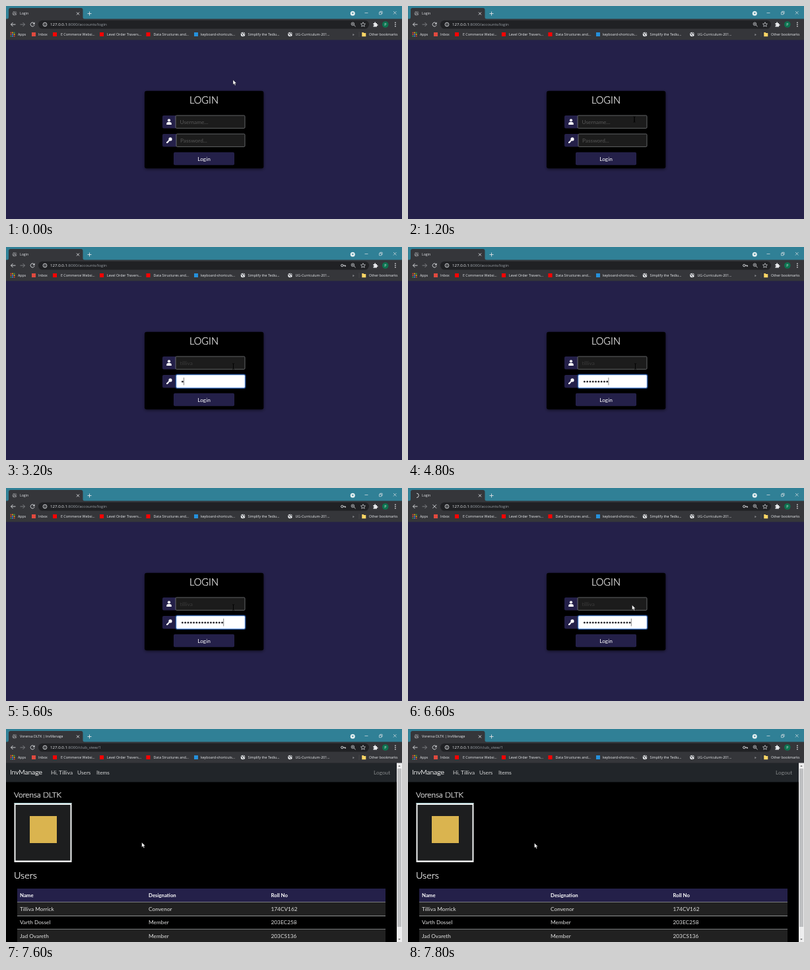
These frames come from a looping animation (600x323 px, 8 s). An HTML page:

```html
<!DOCTYPE html>
<html lang="en">
<head>
<meta charset="utf-8">
<title>Login</title>
<style>
  html, body { margin: 0; width: 100%; height: 100%; overflow: hidden; background: #242049; }
  svg { display: block; width: 100%; height: 100%; }
  text { white-space: pre; }
  .ui { font: 5.3px "Open Sans", "Noto Sans", sans-serif; fill: #e8eaed; }
  .url { font-size: 6.15px; }
  .page { font: 8.3px Lato, sans-serif; fill: #fff; }
  .cell { fill: #e2e2e2; }
  .light { font-weight: 300; stroke: #fff; stroke-width: .22; }
  .bold { font-weight: 700; font-size: 7.8px; }
  .mid { text-anchor: middle; }
  .line { fill: none; stroke: #dfe1e5; stroke-width: .9; }
  .hint { fill: #565656; }
</style>
</head>
<body>
<svg viewBox="0 0 600 323" preserveAspectRatio="none">
  <defs>
    <g id="globe">
      <circle r="3.3" fill="#e8eaed"/>
      <path d="M-2.6-1.2Q-.8-1.6-.6 0T1 2.6M.4-3Q0-1.4 1.6-1.2T3 .4" fill="none" stroke="#35363a" stroke-width="1"/>
    </g>
    <g id="key">
      <circle cx="2" cy="-1.6" r="2.6"/>
      <path d="M.8-1.5L-4 3V4.6H-1.7V3.3H-.4V2L1.8.2Z"/>
    </g>
    <filter id="shadow" x="-10%" y="-10%" width="120%" height="125%">
      <feDropShadow dx="0" dy="1.5" stdDeviation="2" flood-color="#000" flood-opacity=".5"/>
    </filter>
  </defs>

  <g id="loginPage">
    <path fill="#242049" d="M0 51H600V323H0Z"/>
    <rect x="210" y="128.7" width="180.3" height="117.6" rx="3" filter="url(#shadow)"/>
    <g class="page">
      <text class="mid light" x="300" y="148" style="font-size:14.6px">LOGIN</text>
      <path fill="#242049" d="M239 166h18v19.5h-18q-2 0-2-2v-15.5q0-2 2-2zM239 194h19v19.5h-19q-2 0-2-2v-15.5q0-2 2-2z"/>
      <circle cx="247" cy="173.3" r="2.1"/>
      <path d="M243.2 180v-1.3q0-2.7 2.7-2.7h2.2q2.7 0 2.7 2.7v1.3z"/>
      <use href="#key" x="247" y="203.5"/>
      <g id="userField">
        <rect x="257" y="166" width="105" height="19.4" rx="1.5"/>
        <rect x="257" y="166" width="105" height="19.4" rx="1.5"/>
      </g>
      <text id="userText" x="263.5" y="178.5"></text>
      <g id="passField">
        <rect x="258" y="194" width="104" height="19.4" rx="1.5"/>
        <rect x="258" y="194" width="104" height="19.4" rx="1.5"/>
      </g>
      <text id="passHint" class="hint" x="264" y="206.5">Password...</text>
      <g id="dots" fill="#26262c"></g>
      <path id="caret" stroke="#333" stroke-width=".6"/>
      <rect x="254" y="221.7" width="92" height="19.5" rx="2" fill="#242049"/>
      <text class="mid" x="300" y="234.5">Login</text>
    </g>
  </g>

  <g id="clubPage" class="page">
    <path fill="#000" d="M0 51H592V323H0Z"/>
    <path fill="#212529" d="M0 51H592V80.5H0Z"/>
    <text class="light" x="6" y="69" style="font-size:10.4px">InvManage</text>
    <g fill="#d4d5d6">
      <text x="68" y="68.5">Hi, Tilliva</text>
      <text x="108" y="68.5">Users</text>
      <text x="137" y="68.5">Items</text>
    </g>
    <text x="557" y="68.5" fill="#85888a">Logout</text>
    <g id="alert">
      <rect y="81" width="592" height="29" rx="2" fill="#d1e7dd"/>
      <text x="9" y="98.2" fill="#2c6448">You have been successfully logged in!</text>
      <path d="M576 92l7 7m0-7l-7 7" stroke="#5b6560" stroke-width=".9"/>
    </g>
    <g id="content">
      <text class="light" x="12" y="133.8" style="font-size:11.8px">Vorensa DLTK</text>
      <path fill="#f3f5f5" d="M12.5 142H99.5V232H12.5Z"/>
      <path fill="#a9cdd0" d="M12.5 142H99.5V143.2H12.5Z"/>
      <path fill="#1d1e1f" d="M14.5 145H97.5V229.5H14.5Z"/>
      <path fill="#dab44f" d="M36 162H77V203H36Z"/>
      <text class="light" x="12" y="257" style="font-size:14.4px">Users</text>
      <path fill="#242049" d="M17 272H575V293H17Z"/>
      <g id="rows"></g>
    </g>
    <path fill="#eeeeef" d="M592 51H600V323H592Z"/>
    <rect id="thumb" x="593" y="60" width="6" fill="#bfc0c2"/>
    <path fill="#666" d="M594.3 57l1.7-2 1.7 2zM594.3 318l1.7 2 1.7-2z"/>
  </g>

  <g class="ui">
    <path fill="#308096" d="M0 0H600V20H0Z"/>
    <path fill="#35363a" d="M0 19.5H2Q4 19.5 4 17V6Q4 3 7 3H113.5Q116.5 3 116.5 6V17Q116.5 19.5 119 19.5H600V51.5H0Z"/>
    <rect x="49" y="21.7" width="501" height="12.8" rx="6.4" fill="#202124"/>
    <g id="tabGlobe" opacity=".42"><use href="#globe" x="13" y="11.3"/></g>
    <path id="spinner" class="line" d="M0-3.3A3.3 3.3 0 0 1 0 3.3"/>
    <text id="tabTitle" x="21" y="13.3" style="font-size:5.2px"></text>
    <path class="line" d="M107 9.5l4 4m0-4l-4 4M123.5 11.5h6m-3-3v6"/>
    <circle cx="525.3" cy="11.2" r="3.5" fill="#e6f0f2"/>
    <path d="M523.6 10.3h3.4l-1.7 2.2z" fill="#308096"/>
    <path class="line" style="stroke-width:.7" d="M543.5 10.5h5M565.5 9.500h3.300v3.300h-3.300zM566.700 9.200v-1h3.400v3.400h-1M587 8l4.500 4.500m0-4.500l-4.500 4.500"/>
    <path class="line" d="M14.5 28H7.500m3-3l-3 3 3 3"/>
    <path class="line" d="M21.500 28h7m-3-3l3 3-3 3" style="stroke:#85878b"/>
    <g id="reload"><path class="line" d="M42.500 26.100A3 3 0 1 0 43.100 28.600"/><path d="M43.500 24.500v3h-3z"/></g>
    <path id="stop" class="line" d="M37.500 25.200l5.500 5.500m0-5.500l-5.500 5.500"/>
    <circle class="line" cx="59" cy="28" r="2.900"/>
    <path class="line" d="M59 27.500v2M59 26v.7"/>
    <text class="url" x="67" y="30.200">127.0.0.1<tspan id="path" fill="#9aa0a6"></tspan></text>
    <g id="savedKey"><circle class="line" cx="509.300" cy="28" r="1.700"/><path class="line" d="M511 28h3.500v1.700m-1.500-1.700v1.500"/></g>
    <path class="line" d="M527.200 28.800l2.400 2.400"/>
    <path class="line" style="stroke-width:.6" d="M524.200 27.200h2.400m-1.200-1.200v2.400"/>
    <circle class="line" style="stroke-width:.7" cx="525.400" cy="27.200" r="2.300"/>
    <path class="line" style="stroke-width:.7" d="M541 24.600l1 2.300 2.500.2-1.900 1.700.6 2.400-2.200-1.300-2.200 1.300.6-2.400-1.900-1.700 2.500-.2z"/>
    <path d="M556.500 26h1.800q-.3-1.600.9-1.700t.9 1.700h1.900v1.900q1.600-.3 1.700.9t-1.700.9v1.900h-5.500v-1.900q1.300 0 1.300-.9t-1.300-.9z"/>
    <circle cx="574.800" cy="28" r="4.800" fill="#0d7350"/>
    <text class="mid" x="574.800" y="30">P</text>
    <path d="M589.200 24.500h1.400v1.400h-1.400zm0 2.800h1.400v1.400h-1.400zm0 2.800h1.400v1.400h-1.400z"/>
    <g id="bookmarks"></g>
    <text x="525" y="45">»</text>
    <path class="line" d="M535 39v8" style="stroke:#55575b;stroke-width:.5"/>
    <path d="M539.300 40h2.300l.7 1h3v5.300h-6z" fill="#fbd665"/>
    <text x="550" y="45">Other bookmarks</text>
  </g>

  <path id="arrow" d="M0 0V7.300L1.700 5.800 2.900 8.400 4.100 7.900 3 5.300H5.200Z" fill="#fff" stroke="#111" stroke-width=".4"/>
  <path id="beam" d="M-1.500-4.200Q0-4.200 0-3.500V3.500Q0 4.200-1.500 4.200M1.500-4.200Q0-4.200 0-3.500V3.500Q0 4.200 1.500 4.200" fill="none" stroke="#000" stroke-width=".8"/>
</svg>
<script>
const LOOP = 8000, STEP = 200;
const FOCUS_USER = 1400, FOCUS_PASS = 3000, SUBMIT = 6000, LOADED = 6800, DISMISS = 7600;
const USER = 'tilliva';
const $ = id => document.getElementById(id);
const show = (id, on) => $(id).setAttribute('visibility', on ? 'visible' : 'hidden');
const place = (id, x, y, turn = 0) => $(id).setAttribute('transform', `translate(${x} ${y}) rotate(${turn})`);
const clamp = (v, lo, hi) => Math.min(hi, Math.max(lo, v));

// Piecewise linear track of [time, ...values]
function track(points, t) {
  const i = points.findIndex(p => p[0] > t);
  if (i === 0) return points[0].slice(1);
  if (i < 0) return points.at(-1).slice(1);
  const a = points[i - 1], b = points[i], k = (t - a[0]) / (b[0] - a[0]);
  return a.slice(1).map((v, j) => v + (b[j + 1] - v) * k);
}

const POINTER = [
  [0, 344, 112], [200, 344, 116], [600, 344, 146], [1000, 343, 170], [1200, 343, 172],
  [1800, 344.5, 181], [6200, 344.5, 181], [6600, 339.5, 177.5], [6800, 316.5, 168],
  [7400, 220, 171], [7800, 191.5, 173]
];
const PASSWORD = [[FOCUS_PASS, 0], [3200, 1], [4800, 9], [5800, 17]];

const square = color => x => `<rect x="${x - 3}" y="40" width="6" height="6" fill="${color}"/>`;
const globe = x => `<use href="#globe" x="${x}" y="43"/>`;
const appGrid = x => ['#ea4335', '#fbbc04', '#34a853', '#ea4335', '#4285f4', '#fbbc04', '#34a853', '#4285f4', '#ea4335']
  .map((c, i) => `<rect x="${x - 3.4 + i % 3 * 2.6}" y="${39.6 + Math.floor(i / 3) * 2.6}" width="1.7" height="1.7" fill="${c}"/>`).join('');
$('bookmarks').innerHTML = [
  [10, appGrid, 'Apps', 18], [42, square('#e04a3f'), 'Inbox', 49],
  [74, square('#f00'), 'E Commerce Websi...', 83],
  [145, square('#f00'), 'Level Order Travers...', 153],
  [215.5, square('#f00'), 'Data Structures and...', 223.5],
  [288, square('#2490db'), 'keyboard-shortcuts...', 295],
  [359, globe, 'Simplify the Tediu...', 366.5], [430.5, globe, 'UG-Curriculum-201...', 438.5]
].map(([x, icon, label, tx]) => `${icon(x)}<text x="${tx}" y="45">${label}</text>`).join('');

const ROW = 20.5;
$('rows').innerHTML = [
  ['Name', 'Designation', 'Roll No'],
  ['Tilliva Morrick', 'Convenor', '174CV162'],
  ['Varth Dossel', 'Member', '203EC258'],
  ['Jad Ovareth', 'Member', '203CS136']
].map((cells, i) => {
  const y = 272.3 + i * ROW;
  const fill = i % 2 ? `<rect x="17" y="${y}" width="558" height="${ROW}" fill="#212121"/>` : '';
  const rule = `<path d="M17 ${Math.floor(y + ROW) + .5}H575" stroke="#909294"/>`;
  return fill + rule + cells.map((c, j) =>
    `<text class="${i ? 'cell' : 'bold'}" x="${[21, 216, 401.5][j]}" y="${y + 13.1}">${c}</text>`).join('');
}).join('');

const PITCH = 4.3, DOT_X = 265.2;
$('dots').innerHTML = Array.from({ length: 17 }, (_, i) =>
  `<circle cx="${DOT_X + PITCH * (i + .5)}" cy="204.2" r="1.35"/>`).join('');

function paintField(id, focused) {
  const [glow, box] = $(id).children;
  glow.setAttribute('style', `fill:none;stroke:#173a72;stroke-width:${focused ? 3 : 0}`);
  box.setAttribute('style', `fill:${focused ? '#fff' : '#1c1c1c'};stroke:${focused ? '#86b7fe' : '#85878a'};stroke-width:.7`);
}

function drawLogin(t) {
  const onPass = t >= FOCUS_PASS, onUser = !onPass && t >= FOCUS_USER;
  const typed = USER.slice(0, clamp(Math.floor((t - FOCUS_USER) / STEP), 0, USER.length));
  const count = onPass ? Math.round(track(PASSWORD, t)[0]) : 0;
  paintField('userField', onUser);
  paintField('passField', onPass);
  const label = $('userText');
  label.textContent = typed || 'Username...';
  label.style.fill = !typed ? '#565656' : onUser ? '#212529' : '#3b3b3b';
  show('passHint', !count);
  [...$('dots').children].forEach((dot, i) => dot.setAttribute('opacity', i < count ? 1 : 0));
  const caretX = onPass ? DOT_X + PITCH * count : 263.7 + (typed ? label.getComputedTextLength() : 0);
  $('caret').setAttribute('d', onPass || onUser ? `M${caretX} ${onPass ? 198 : 170}v11.5` : '');
}

function drawClub(t) {
  const alertOpen = t < DISMISS;
  $('alert').style.display = alertOpen ? '' : 'none';
  place('content', 0, alertOpen ? 0 : -30);
  $('thumb').setAttribute('height', alertOpen ? 217 : 240);
}

function draw(t) {
  const loaded = t >= LOADED, loading = t >= SUBMIT && !loaded;
  $('loginPage').style.display = loaded ? 'none' : '';
  $('clubPage').style.display = loaded ? '' : 'none';
  (loaded ? drawClub : drawLogin)(t);

  $('tabTitle').textContent = loaded ? 'Vorensa DLTK | InvManage' : 'Login';
  $('path').textContent = loaded ? ':8000/club_view/1' : ':8000/accounts/login';
  show('savedKey', t >= FOCUS_PASS);
  show('tabGlobe', !loading);
  show('spinner', loading);
  show('reload', !loading);
  show('stop', loading);
  place('spinner', 13, 11.3, (t - 6600) * .26);

  const [x, y] = track(POINTER, t);
  const overField = t < 6400 && y > 166;
  show('arrow', !overField);
  show('beam', overField);
  place('arrow', x, y);
  place('beam', x, y);
}

function tick(now) {
  draw(Math.floor(now % LOOP / STEP) * STEP);
  requestAnimationFrame(tick);
}
draw(0);
requestAnimationFrame(tick);
</script>
</body>
</html>
```
